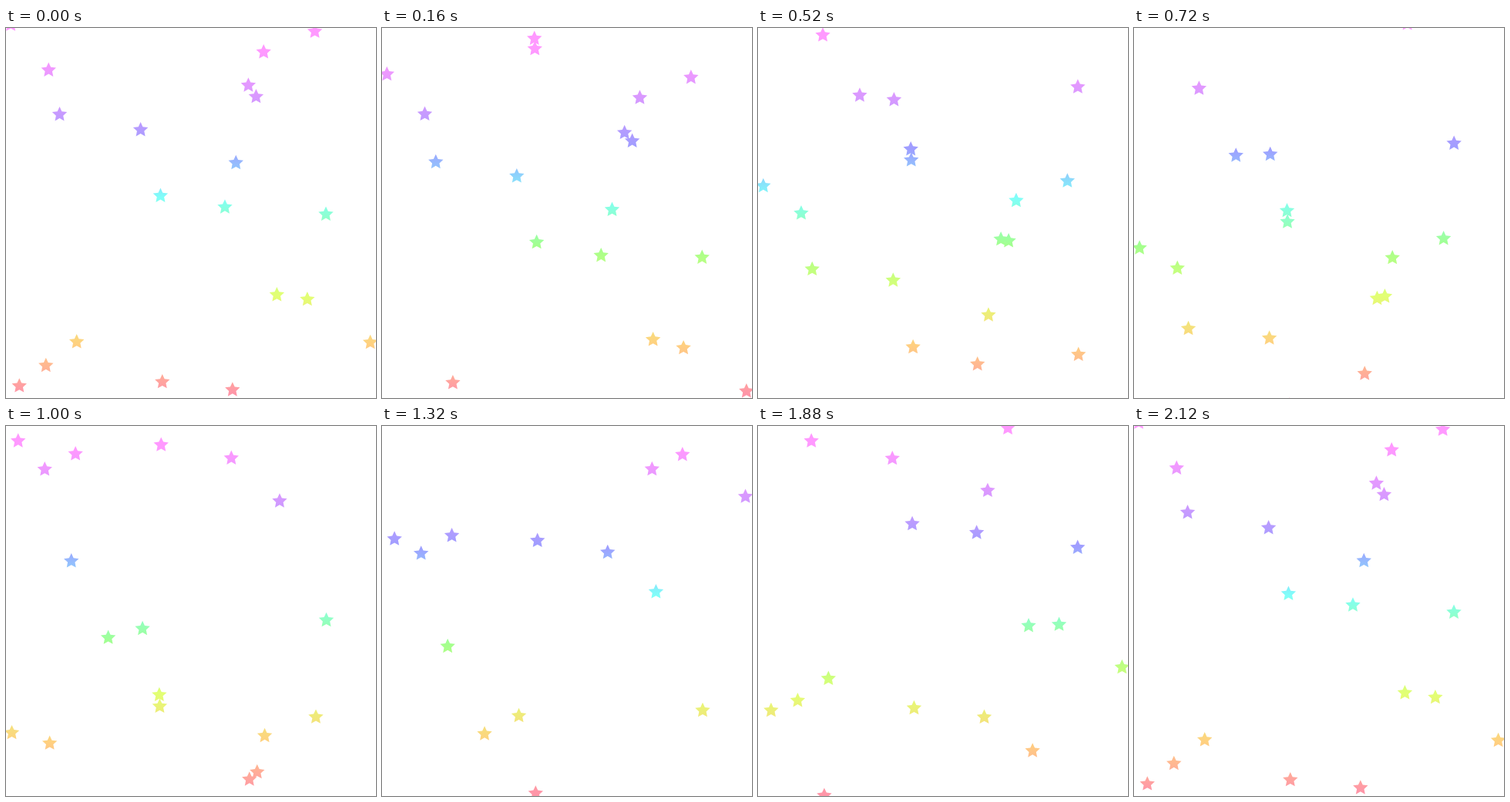
Recreate the animation shown at these times as an HTML page. Size 480 by 480 pixels, loop 2.16 s.

```html
<!DOCTYPE html>
<html lang="en">
<head>
<meta charset="utf-8">
<title>Falling rainbow stars</title>
<style>
  html, body { margin: 0; width: 100%; height: 100%; overflow: hidden; background: #fff; }
  svg { display: block; width: 100%; height: 100%; }
</style>
</head>
<body>
<svg viewBox="0 0 480 480">
  <defs>
    <linearGradient id="rainbow" gradientUnits="userSpaceOnUse" x1="0" y1="30" x2="0" y2="474"></linearGradient>
  </defs>
  <path id="stars" fill="url(#rainbow)"/>
</svg>
<script>
const STEP = 40, FRAMES = 54, CYCLE = FRAMES - 1;
const MIDDLE = 240, DRIFT = 0.055;

// Evenly spaced from top to bottom.
const colors = ['#ff99ff', '#d699ff', '#9e9eff', '#80fff9', '#a4ff8c', '#e2ff74', '#ffd080', '#ff96a8'];

// Where and in which frame each star crosses mid-height, slowest star first.
const crossings = [
  [91, -12.6], [51, -14.5], [85, 29.7], [415, -0.1], [177, 23.4], [56, 13],
  [325, 10.5], [351, -7.3], [415.5, 24.2], [355.5, 34.7], [335, 14.1], [401.5, 15.8],
  [175, 7.2], [200.5, 1.5], [298.5, 4.3], [293, -15], [315, 10.8], [70, 8.3],
  [202, -14.1], [132.5, 22.8], [284, 0.5], [390.5, -7.1], [472, -10.6], [16.5, -14.1],
  [198.5, 18.2], [199, 17.3], [7, 15.2]
];

const speed = rank => 13.25 + 2.85 * (rank / (crossings.length - 1)) ** 0.62;

// Wraps a frame offset to half a cycle either side of zero.
const wrap = t => t - CYCLE * Math.round(t / CYCLE);

const corners = Array.from({ length: 10 }, (_, i) => {
  const radius = i % 2 ? 4.9 : 10.2, angle = (i / 5 - 0.5) * Math.PI;
  return [radius * Math.cos(angle), radius * Math.sin(angle) + 0.3];
});

function starPath(x, y) {
  return 'M' + corners.map(([dx, dy]) => `${(x + dx).toFixed(2)} ${(y + dy).toFixed(2)}`).join('L') + 'Z';
}

document.getElementById('rainbow').innerHTML = colors
  .map((color, i) => `<stop offset="${i / (colors.length - 1)}" stop-color="${color}"/>`).join('');
const path = document.getElementById('stars');

function render(ms) {
  const frame = Math.floor((ms % (STEP * FRAMES)) / STEP);
  path.setAttribute('d', crossings.map(([x, crossing], rank) => {
    const t = wrap(frame - crossing);
    return starPath(x + DRIFT * t, MIDDLE + speed(rank) * t);
  }).join(''));
}

const start = performance.now();
function tick() {
  render(performance.now() - start);
  requestAnimationFrame(tick);
}
tick();
</script>
</body>
</html>
```
